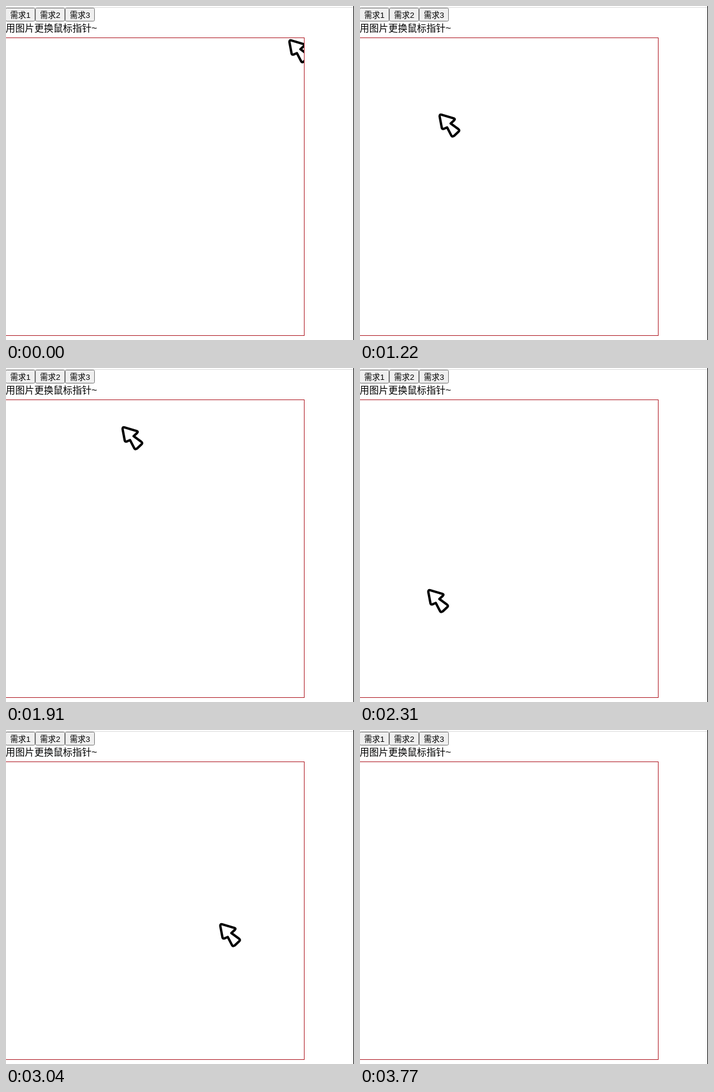
Recreate the animation shown at these times as an HTML page. Size 584 by 562 pixels, loop 4.22 s.

```html
<!DOCTYPE html>
<html lang="zh">
<head>
<meta charset="utf-8">
<style>
  html, body { margin: 0; width: 100%; height: 100%; overflow: hidden; background: #fff; }
  svg { display: block; width: 584px; height: 562px; }
  text { font-family: "Liberation Sans", "Noto Sans CJK SC", "Noto Sans CJK", sans-serif; fill: #000; }
  .btn rect { fill: #efefef; stroke: #767676; }
  .btn text { font-size: 13.33px; }
</style>
</head>
<body>
<svg viewBox="0 0 584 562">
  <defs>
    <clipPath id="inside"><rect x="0" y="54" width="500" height="500"/></clipPath>
  </defs>
  <rect width="584" height="562" fill="#fff"/>
  <path d="M0 2.5H583" stroke="#dcdcdc"/>
  <path d="M583.5 0V562" stroke="#000"/>
  <g id="buttons"></g>
  <text x="-.4" y="43" font-size="16">用图片更换鼠标指针~</text>
  <rect x="-1.5" y="53.5" width="502" height="501" fill="none" stroke="#b01c26"/>
  <g clip-path="url(#inside)">
    <g id="big">
      <path transform="translate(.6 .7)" fill="#fff" stroke="#000" stroke-width="4" stroke-linejoin="round"
        d="M5 2.2L26 8.5Q28.5 9.5 26.5 11.5L20.5 17L33.5 26.5Q36 28.5 34 30.5L26 38Q23 40 21.5 37L14.5 23.5L9.5 25.8Q6 27 5.6 24L2 5Q2 1.5 5 2.2Z"/>
    </g>
  </g>
  <path id="arrow" fill="#fff" stroke="#000" d="M.5 .5V16.5L4.2 13L6.6 18.5L9 17.5L6.7 12H11.5Z"/>
</svg>
<script>
const LOOP = 4220, START = 160, END = 3770, REST_AT = 530, REST = 200;
const $ = id => document.getElementById(id);
const clamp = (v, lo, hi) => Math.min(Math.max(v, lo), hi);

$("buttons").innerHTML = [1, 2, 3].map((n, i) =>
  `<g class="btn" transform="translate(${i * 50 - 1} 3)">
    <rect x=".5" y=".5" width="49" height="22" rx="2"/>
    <text x="8" y="17">需求${n}</text></g>`).join("");

// Turning points of the pointer: time without the rest, left, top
const path = [
  [120, 473, 55], [280, 540, 190], [450, 446, 498], [530, 455, 453],
  [650, 370, 425], [1020, 131, 180], [1060, 112, 162], [1300, 68, 115],
  [1620, 116, 103], [1710, 193, 97], [1880, 294, 200], [2030, 205, 358],
  [2150, 87, 353], [2350, 180, 156], [2520, 57, 268], [2680, 225, 300],
  [2910, 390, 335], [3160, 352, 377], [3210, 372, 399], [3570, 505, 555]
];
const last = path.length - 1;

// Steps of 40 ms, with 10 ms more about every 19th step
const tickTime = n => START + 40 * n + 10 * Math.floor((n + 13.2) / 18.6);

function heldTime(time) {
  if (time < START) return 0;
  let n = 0;
  while (tickTime(n + 1) <= time) n++;
  return tickTime(n);
}

function slope(i, k) {
  const a = path[Math.max(i - 1, 0)], b = path[Math.min(i + 1, last)];
  return (b[k] - a[k]) / (b[0] - a[0]);
}

// Smooth curve through the turning points
function place(time) {
  const t = clamp(time - clamp(time - REST_AT, 0, REST), path[0][0], path[last][0]);
  let i = 0;
  while (i < last - 1 && path[i + 1][0] <= t) i++;
  const a = path[i], b = path[i + 1], d = b[0] - a[0], u = (t - a[0]) / d, v = 1 - u;
  return [1, 2].map(k =>
    v * v * (1 + 2 * u) * a[k] + u * u * (3 - 2 * u) * b[k] +
    d * u * v * (v * slope(i, k) - u * slope(i + 1, k)));
}

function show(el, on, x, y) {
  el.style.display = on ? "" : "none";
  el.setAttribute("transform", `translate(${Math.round(x)} ${Math.round(y)})`);
}

function draw(time) {
  const [x, y] = place(heldTime(time));
  const hx = x + 18, hy = y + 20;
  const inside = hx < 501 && hy < 554;
  show($("big"), time < END && inside, x, y);
  show($("arrow"), time < END && !inside, hx, hy);
}

const start = performance.now();
function frame() {
  draw((performance.now() - start) % LOOP);
  requestAnimationFrame(frame);
}
frame();
</script>
</body>
</html>
```
